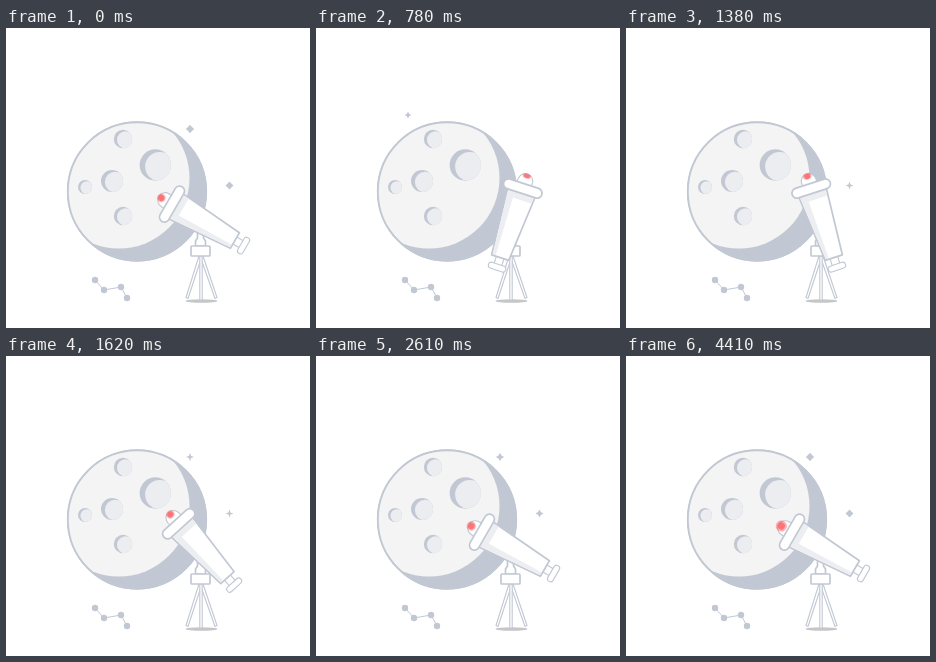
An HTML page that plays this animation: 304 by 300 pixels, repeating every 4470 ms.

```html
<!DOCTYPE html>
<html lang="en">
<head>
<meta charset="utf-8">
<title>Telescope and moon</title>
<style>
  html, body { margin: 0; width: 100%; height: 100%; overflow: hidden; background: #fff; }
  svg { display: block; width: 100%; height: 100%; }
  .grey { fill: #c2c8d3; }
  .line { fill: #fff; stroke: #c2c8d3; stroke-width: 1.7; stroke-linejoin: round; }
  .fine { stroke-width: 1.1; }
  .link { fill: none; stroke: #c2c8d3; }
</style>
</head>
<body>
<svg viewBox="0 0 304 300">
  <defs>
    <clipPath id="disc"><circle cx="131" cy="163.5" r="69.5"/></clipPath>
  </defs>

  <circle class="grey" cx="131" cy="163.5" r="70"/>
  <circle cx="113" cy="150" r="70.5" fill="#f4f4f4" clip-path="url(#disc)"/>
  <circle class="link" cx="131" cy="163.5" r="69.2" stroke-width="1.9"/>
  <g id="craters"></g>
  <g id="stars" class="grey"></g>

  <path class="link" d="M89 252L98 262L115 259L121 270"/>
  <g class="grey">
    <circle cx="89" cy="252" r="3.2"/><circle cx="98" cy="262" r="3.2"/>
    <circle cx="115" cy="259" r="3.2"/><circle cx="121" cy="270" r="3.2"/>
  </g>

  <ellipse cx="195.5" cy="273" rx="16" ry="1.8" fill="#c6c6c6"/>
  <g class="line fine">
    <path d="M193 228L180 269.5L182 270.5L196 228Z"/>
    <path d="M194 228L209 270.5L211 269.5L197 228Z"/>
    <path d="M193.8 228H196.2V272H193.8Z"/>
  </g>
  <path class="line" d="M191.5 204V210L189.5 213V218H199.5V213L197.5 210V204Z"/>
  <rect class="line" x="185" y="218" width="19" height="10" rx="1"/>

  <g id="scope">
    <path class="line fine" d="M-36-7.5H-42.5A7.5 7.5 0 0 0-42.5 7.5H-36Z"/>
    <g id="lamp" fill="#ff5357">
      <circle id="halo" opacity=".45"/>
      <circle id="core" opacity=".65"/>
    </g>
    <path class="line fine" d="M37-4H46V4H37Z"/>
    <rect class="line fine" x="45" y="-9" width="6" height="18" rx="2.8"/>
    <path class="line" d="M-31-14.5L38-9V9L-31 14.5Z"/>
    <path d="M-29-13.4L-23-13V6.5L37 5V8.2L-29 13.4Z" fill="#eceef1"/>
    <rect class="line" x="-39.7" y="-20" width="10" height="40" rx="5"/>
  </g>
</svg>
<script>
const LOOP = 4470, SWING = 900, TAU = 2 * Math.PI;
const el = id => document.getElementById(id);
const clamp = v => Math.max(0, Math.min(1, v));
const wave = (t, period, peak) => Math.cos((t - peak) / period * TAU);

function add(parent, name, attrs = {}) {
  const node = document.createElementNS('http://www.w3.org/2000/svg', name);
  for (const key in attrs) node.setAttribute(key, attrs[key]);
  return parent.appendChild(node);
}

function addCrater(cx, cy, r) {
  const id = `crater${cx}-${cy}`, group = el('craters');
  add(add(group, 'clipPath', { id }), 'circle', { cx, cy, r });
  add(group, 'circle', { cx, cy, r, class: 'grey' });
  add(group, 'circle', {
    cx: cx + r * .28, cy: cy + r * .1, r: r * .93, fill: '#ebedf0', 'clip-path': `url(#${id})`
  });
}
addCrater(117, 111, 9.2);
addCrater(149.3, 137, 15.7);
addCrater(106, 153, 11);
addCrater(79, 159, 7);
addCrater(117, 188, 9.2);

// Each star lights up `count` times, `gap` ms apart, for `half` ms either side of a peak.
const stars = [
  { x: 184, y: 101, size: 4.2, first: 2150, gap: 1780, count: 2, half: 750 },
  { x: 223.5, y: 157.5, size: 4, first: 1310, gap: LOOP / 3, count: 3, half: 480 },
  { x: 92, y: 87, size: 3.4, first: 780, gap: LOOP / 4, count: 4, half: 270 }
];
for (const star of stars) star.node = add(el('stars'), 'path');

function glow({ first, gap, count, half }, t) {
  let best = 0;
  for (let i = 0; i < count; i++) {
    const away = Math.abs(t - first - i * gap);
    const near = Math.min(away, LOOP - away);
    best = Math.max(best, clamp(4 * (1 - near / half)));
  }
  return best;
}

// Eight points: tips on the axes, waist points on the diagonals.
function starPath(x, y, r, waist) {
  const points = Array.from({ length: 8 }, (_, i) => {
    const reach = i % 2 ? r * waist * Math.SQRT2 : r, a = i * TAU / 8;
    return [x + reach * Math.cos(a), y + reach * Math.sin(a)];
  });
  return 'M' + points.join('L') + 'Z';
}

function draw(t) {
  const turn = clamp(1 - Math.abs(t - SWING) / SWING);
  el('scope').setAttribute('transform', `translate(196 193.5) rotate(${30 + 90 * turn})`);

  const pulse = t < 1980 ? 0 : .5 + .5 * wave(t, 540, 3330);
  el('lamp').setAttribute('transform', `translate(${-47 - turn} 0) scale(${1 - turn * .45} 1)`);
  el('halo').setAttribute('r', 4.3 + 1.3 * pulse);
  el('core').setAttribute('r', 3 + .6 * pulse);

  // Stars drift between a sharp cross and a plain diamond.
  const waist = .38 + .13 * wave(t, LOOP, 3900);
  for (const star of stars) {
    const k = glow(star, t);
    star.node.setAttribute('d', k ? starPath(star.x, star.y, star.size * k, waist) : '');
  }
}

const began = performance.now();
function tick() {
  draw((performance.now() - began) % LOOP);
  requestAnimationFrame(tick);
}
tick();
</script>
</body>
</html>
```
